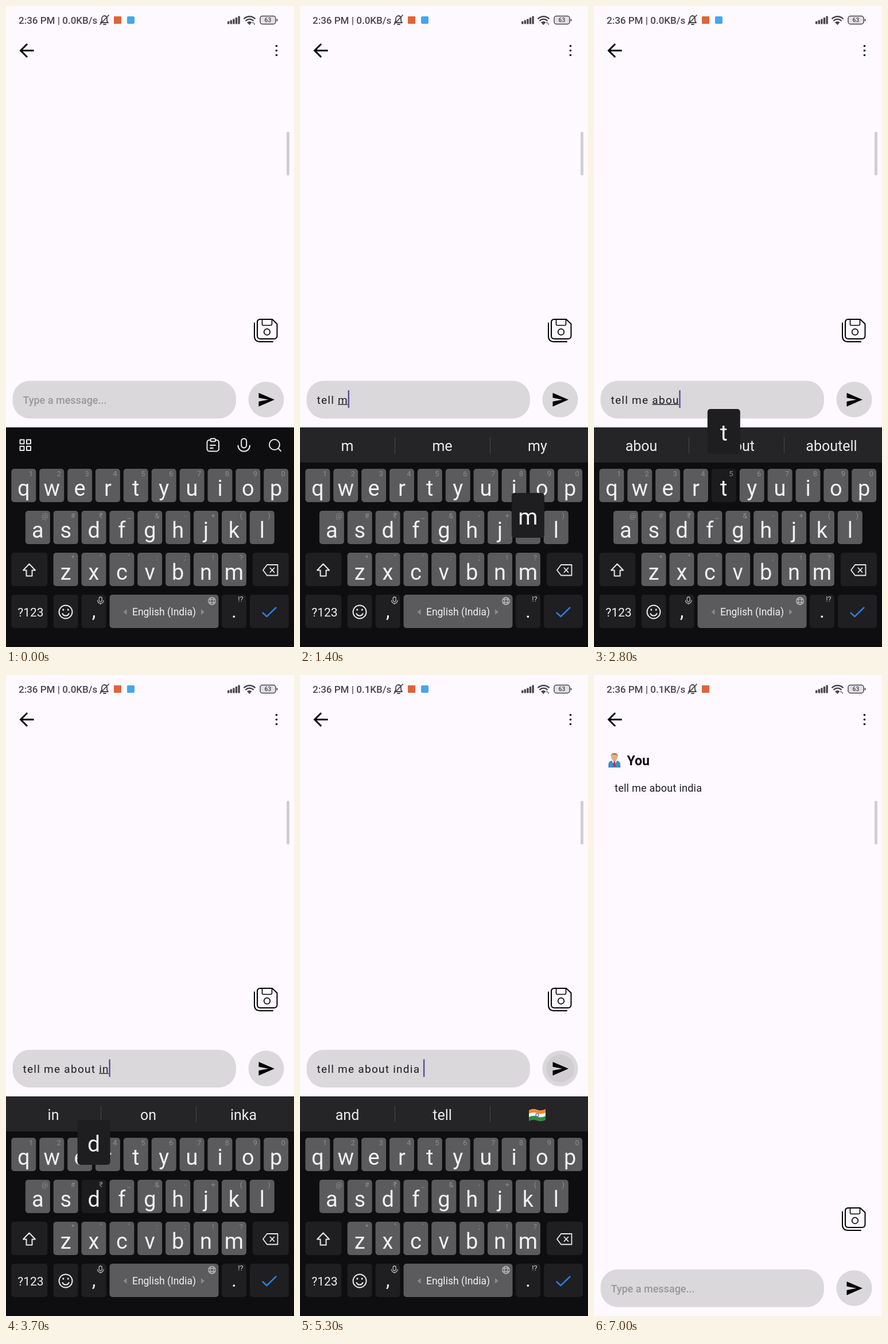
An HTML page that plays this animation: 502 by 1115 pixels, repeating every 8 s.

```html
<!DOCTYPE html>
<html lang="en">
<head>
<meta charset="utf-8">
<title>Chat typing</title>
<style>
  html, body { margin: 0; width: 100%; height: 100%; overflow: hidden; background: #fef9ff; }
  svg { display: block; width: 100vw; height: 100vh; font-family: Roboto, "Noto Sans", sans-serif; }
  text { white-space: pre; }
  .mid { text-anchor: middle; }
  .line { fill: none; stroke: #000; stroke-linecap: round; stroke-linejoin: round; }
  .pale { fill: none; stroke: #e9e8eb; stroke-width: 2; stroke-linecap: round; stroke-linejoin: round; }
  .status { fill: #49474b; }
  .key { fill: #5b5a5d; }
  .dark { fill: #1f1e21; }
  .key.down { fill: #1c1b1e; }
  .letter { font-size: 38px; fill: #f1f0f3; text-anchor: middle; }
  .hint { font-size: 13px; fill: #8d8c8f; text-anchor: middle; }
  .word { font-size: 25px; fill: #ecebee; text-anchor: middle; }
  .typed { font-size: 19px; letter-spacing: 1.27px; fill: #1d1b20; }
  .said { font-size: 18px; letter-spacing: .25px; fill: #1d1b20; }
</style>
</head>
<body>
<svg viewBox="0 0 502 1115" preserveAspectRatio="none">
  <rect width="502" height="1115" fill="#fef9ff"/>

  <g class="status">
    <text id="clock" x="22" y="31" font-size="17" font-weight="500"></text>
    <g fill="none" stroke="#49474b" stroke-width="1.8" stroke-linecap="round" stroke-linejoin="round">
      <path d="M165 29h13l-2-3v-4a5 5 0 0 0-4-5a5 5 0 0 0-5 5v4zM170 32h4M164 32L179 16"/>
    </g>
    <rect x="188" y="18" width="13" height="13" rx="1" fill="#df6438"/>
    <rect id="kbIcon" x="211" y="18" width="13" height="13" rx="2" fill="#43a7ec"/>
    <g id="bars"></g>
    <g fill="none" stroke="#49474b" stroke-width="2.4">
      <path d="M414.500 22.500a14 14 0 0 1 20 0M417.500 26a9.500 9.500 0 0 1 14 0"/>
    </g>
    <path d="M420 28.500a6 6 0 0 1 8.500 0L424.300 33z"/>
    <path id="arrows" d="M429 30l1.500-2.500L432 30zM431.500 30.500h3L433 33z"/>
    <rect x="443" y="17.500" width="27" height="14" rx="4" fill="#e3e1e5" stroke="#49474b" stroke-width="1.500"/>
    <rect x="471.500" y="22.500" width="2" height="4" rx="1"/>
    <text class="mid" x="456.500" y="28.300" font-size="10.500" font-weight="500">63</text>
  </g>

  <path class="line" stroke-width="3" style="stroke-linecap:butt;stroke-linejoin:miter" d="M48.500 77.500H26M37 66L25.500 77.500L37 89"/>
  <g><circle cx="471.500" cy="69.500" r="1.800"/><circle cx="471.500" cy="77.500" r="1.800"/><circle cx="471.500" cy="85.500" r="1.800"/></g>

  <g id="chat">
    <path d="M25 161v-5q0-6 6-7h9q6 1 6 7v5z" fill="#3791d2"/>
    <path d="M31 149l4.500 9l4.500-9z" fill="#f2f4f7"/>
    <path d="M34.200 150.500h2.600l1.200 7l-2.500 3.500l-2.500-3.500z" fill="#c9303b"/>
    <rect x="33" y="145" width="5" height="5" fill="#d79a6c"/>
    <ellipse cx="35.500" cy="142.500" rx="5.600" ry="6.500" fill="#e5ae82"/>
    <path d="M29.500 142q-.5-6 6-6.200t6 6.200q-1.500-3-3-3.500q-4 1-7-.5z" fill="#a67b52"/>
    <text x="57.500" y="157" font-size="23" font-weight="700" fill="#0b0a0c">You</text>
    <text id="said" class="said" x="36" y="203"></text>
  </g>

  <rect x="489" y="219" width="5" height="75.500" rx="1.500" fill="#d1ced3"/>

  <g id="dock">
    <g class="line" stroke-width="2">
      <path d="M443 545H464L472.500 553V573.500Q472.500 579 467 579H443.500Q438 579 438 573.500V550.500Q438 545 443 545Z"/>
      <path stroke-width="1.600" d="M446.500 545V553.500Q446.500 555.500 448.500 555.500H461Q463.500 555.500 463.500 553.500V545"/>
      <circle cx="455" cy="567" r="5.300" stroke-width="1.700"/>
      <path d="M433 551.500V574Q433 584 443 584H465"/>
    </g>
    <rect x="11.500" y="652" width="389.500" height="65.500" rx="30" fill="#dad8db"/>
    <text id="holder" x="29.500" y="691.500" font-size="18" font-weight="500" fill="#99979b">Type a message...</text>
    <text id="typed" class="typed" x="29.500" y="691.500"></text>
    <rect id="under" y="692.500" height="1.300" fill="#1d1b20"/>
    <rect id="caret" y="668.500" width="2.500" height="30.500" fill="#5b4f9e"/>
    <circle cx="453.500" cy="684.500" r="31" fill="#dad8db"/>
    <circle id="ripple" cx="453.500" cy="684.500"/>
    <path d="M440.500 673L468 684.800L440.500 696.700V688L457.500 684.800L440.500 681.500Z"/>
  </g>

  <g id="board">
    <rect y="733" width="502" height="383" fill="#0e0d10"/>
    <g id="tools" class="pale">
      <path d="M24.500 754.500h7v7h-7zM36 754.500h7v7h-7zM24.500 766h7v7h-7zM36 766h7v7h-7z"/>
      <rect x="350.500" y="755" width="20.500" height="19.500" rx="4"/>
      <rect x="356.500" y="752.500" width="8.500" height="5" rx="1.500" fill="#0e0d10"/>
      <path d="M356 764h9M356 769h5"/>
      <rect x="410.200" y="752.500" width="9" height="16" rx="4.500"/>
      <path d="M404.500 764.500a10.200 10.200 0 0 0 20.500 0"/>
      <circle cx="468" cy="763" r="9"/><path d="M474.500 769.500L479 774"/>
    </g>
    <g id="hints">
      <rect y="733" width="502" height="61" fill="#252427"/>
      <path d="M165.500 750v28M331.500 750v28" stroke="#48474b"/>
      <text class="word" x="82.500" y="774"></text>
      <text class="word" x="248" y="774"></text>
      <text class="word" x="414" y="774"></text>
      <g id="flag">
        <path d="M399 757q7-4 14-1t15-1v6q-8 4-15 1t-14 1z" fill="#f28a2e"/>
        <path d="M399 763q7-4 14-1t15-1v7q-8 4-15 1t-14 1z" fill="#f5f3ee"/>
        <path d="M399 769q7-4 14-1t15-1v7q-8 4-15 1t-14 1z" fill="#2e8f45"/>
        <circle cx="413.500" cy="765.500" r="2.500" fill="none" stroke="#4c5a9e" stroke-width="1.200"/>
      </g>
    </g>
    <g id="keys"></g>
    <g class="pale">
      <path d="M40.500 970.500L51 981.500H45.500V991.500H35.500V981.500H30Z"/>
      <path d="M455 972H473.500V990.500H455L448 981.200ZM460.500 977.500L467.500 985M467.500 977.500L460.500 985" stroke-width="1.800"/>
      <circle cx="104" cy="1054" r="11.500"/>
      <path d="M98.500 1057a6 6 0 0 0 11 0" />
      <path d="M99.800 1050v.6M108.200 1050v.6" stroke-width="2.800"/>
      <g stroke="#b9b8bb" stroke-width="1.300">
        <rect x="162.200" y="1028" width="5" height="8" rx="2.500"/>
        <path d="M159.500 1034a5.200 5.200 0 0 0 10.500 0M164.700 1039v1.500"/>
        <circle cx="359" cy="1035" r="6.300"/>
        <ellipse cx="359" cy="1035" rx="2.800" ry="6.300"/>
        <path d="M353.500 1032.500h11M353.500 1037.500h11"/>
      </g>
      <path d="M447.500 1055.500L454.500 1062L470.500 1046.500" stroke="#2a7ee0" stroke-width="2.500"/>
    </g>
    <path d="M210.500 1049v10l-6-5zM340 1049v10l6-5z" fill="#89888b"/>
    <text class="mid" x="275.500" y="1060" font-size="17.500" fill="#f1f0f3">English (India)</text>
    <text class="mid" x="43" y="1062" font-size="21" fill="#f1f0f3">?123</text>
    <text class="letter" x="153" y="1064" style="font-size:34px">,</text>
    <text class="letter" x="397.500" y="1064" style="font-size:34px">.</text>
    <text class="hint" x="409" y="1036" style="fill:#d0cfd2">!?</text>
    <g id="popup">
      <rect width="57" height="78" rx="5" fill="#1e1d20"/>
      <text class="letter" x="28.500" y="55" style="font-size:39px"></text>
    </g>
  </g>
</svg>

<script>
const LOOP = 8000, SEND = 5350, TYPE_FROM = 5305, CHAR_MS = 30;
const $ = id => document.getElementById(id);
const show = (node, on) => node.setAttribute('visibility', on ? 'visible' : 'hidden');
const put = (node, text) => { if (node.textContent !== text) node.textContent = text; };
const clamp = x => Math.max(0, Math.min(1, x));

// key, press, release
const strokes = [
  ['t', 90, 190], ['e', 290, 380], ['l', 490, 570], ['l', 690, 770], [' ', 990, 1080],
  ['m', 1280, 1370], ['e', 1480, 1560], [' ', 1580, 1680],
  ['a', 1890, 1980], ['b', 2090, 2170], ['o', 2270, 2360], ['u', 2590, 2660], ['t', 2780, 2870], [' ', 3380, 3450],
  ['i', 3490, 3560], ['n', 3570, 3650], ['d', 3680, 3770], ['i', 3860, 3940], ['a', 3990, 4070], [' ', 4120, 4190]
];
const message = strokes.map(s => s[0]).join('');

// suggestions after each stroke
const offers = [
  't,the,to', 'te,the,tell', 'tel,tell,tekl', 'tell,tell me,yell', 'me,you,us',
  'm,me,my', 'me,my,mr', 'about,the,what',
  'a,and,about', 'ab,an,about', 'abo,about,above', 'abou,about,aboutell', 'about,but,above', 'the,it,this',
  'i,I,in', 'in,on,inka', 'ind,and,india', 'indi,India,india', 'india,India,Indian', 'and,tell,'
].map(s => s.split(','));

// keyboard
const caps = {};
let art = '';
function cap(id, x, y, w, kind) {
  caps[id] = { x, y, w };
  art += `<rect class="key ${kind}" data-key="${id}" x="${x}" y="${y}" width="${w}" height="58" rx="5"/>`;
}
[['qwertyuiop', '1234567890', 9.3, 805], ['asdfghjkl', '@#₹_&-+()', 33.8, 878], ['zxcvbnm', '*"\':;!?', 82.6, 951]]
  .forEach(([letters, marks, left, y]) => [...letters].forEach((c, i) => {
    const x = +(left + 48.88 * i).toFixed(1);
    cap(c, x, y, 43, '');
    art += `<text class="hint" x="${x + 34}" y="${y + 12.5}">${marks[i]}</text>` +
           `<text class="letter" x="${x + 21.5}" y="${y + 46.5}">${c}</text>`;
  }));
cap('shift', 9.3, 951, 63, 'dark');
cap('back', 430, 951, 63, 'dark');
cap('num', 9.3, 1024, 63, 'dark');
cap('smile', 82.6, 1024, 43, 'dark');
cap('comma', 131.5, 1024, 43, 'dark');
cap(' ', 180.5, 1024, 190, '');
cap('dot', 376, 1024, 43, 'dark');
cap('enter', 425, 1024, 68, 'dark');
$('keys').innerHTML = art;
document.querySelectorAll('[data-key]').forEach(r => caps[r.dataset.key].node = r);

$('bars').innerHTML = [5, 7, 9, 11.5, 14].map((h, i) =>
  `<rect x="${386 + i * 4.6}" y="${31.5 - h}" width="3.4" height="${h}" rx="1"/>`).join('');

// widths of typed prefixes, measured once per length
const widths = {};
const typed = $('typed');
function widthOf(n) {
  if (!(n in widths)) {
    typed.textContent = message.slice(0, n);
    widths[n] = n ? typed.getComputedTextLength() : 0;
  }
  return widths[n];
}

function along(steps, t) {
  if (t <= steps[0][0]) return steps[0][1];
  for (let i = 1; i < steps.length; i++) {
    const [t0, v0] = steps[i - 1], [t1, v1] = steps[i];
    if (t < t1) return v0 + (v1 - v0) * (t - t0) / (t1 - t0);
  }
  return steps[steps.length - 1][1];
}
const boardPath = [[5340, 0], [5400, 135], [5450, 258], [5500, 335], [5550, 370], [5600, 383]];
const dockPath = [[5350, 0], [5400, 110], [5450, 235], [5500, 320], [5550, 364], [5610, 382]];
const rippleFade = [[5200, 0], [5300, .05], [5420, .1], [5520, .1], [5780, 0]];

function drawInput(t, sent) {
  const n = sent ? 0 : strokes.filter(s => t >= s[2]).length;
  const start = message.lastIndexOf(' ', n - 1) + 1;
  const from = widthOf(n ? start : 0), to = widthOf(n);
  put(typed, message.slice(0, n));
  show($('holder'), !n);
  show($('under'), n > start);
  $('under').setAttribute('x', 29.5 + from);
  $('under').setAttribute('width', Math.max(0, to - from - 1));
  $('caret').setAttribute('x', 29 + to);
  show($('caret'), n && (t - strokes[n - 1][2]) % 1000 < 500);

  show($('tools'), !n);
  show($('hints'), n);
  show($('flag'), n === message.length);
  document.querySelectorAll('.word').forEach((w, i) => put(w, n ? offers[n - 1][i] : ''));
}

function drawKeys(t) {
  const last = strokes.filter(s => t >= s[1]).pop();
  const held = last && t < last[2] ? last[0] : null;
  for (const id in caps) caps[id].node.classList.toggle('down', id === held);
  const up = last && last[0] !== ' ' && t < last[2] + 60;
  show($('popup'), up);
  if (up) {
    const k = caps[last[0]];
    $('popup').setAttribute('transform', `translate(${k.x - 7} ${k.y - 104})`);
    put($('popup').lastElementChild, last[0]);
  }
}

function drawChat(t, sent) {
  show($('chat'), sent);
  const count = Math.floor((t - TYPE_FROM) / CHAR_MS);
  const extra = count - message.length;
  const cursor = extra < 0 || (extra < 8 && extra % 2 === 0);
  put($('said'), sent ? message.slice(0, Math.max(0, count)) + (cursor ? '_' : '') : '');
}

function draw(t) {
  const sent = t >= SEND;
  put($('clock'), `2:36 PM | 0.${t < 4000 ? 0 : 1}KB/s`);
  show($('kbIcon'), t < 5450);
  show($('arrows'), t < 1900 || t >= 4600);
  drawInput(t, sent);
  drawKeys(t);
  drawChat(t, sent);
  $('board').setAttribute('transform', `translate(0 ${along(boardPath, t)})`);
  $('dock').setAttribute('transform', `translate(0 ${along(dockPath, t)})`);
  $('ripple').setAttribute('r', 26 * clamp((t - 5180) / 130));
  $('ripple').setAttribute('opacity', along(rippleFade, t));
}

const begin = performance.now();
function tick() {
  draw((performance.now() - begin) % LOOP);
  requestAnimationFrame(tick);
}
tick();
</script>
</body>
</html>
```
